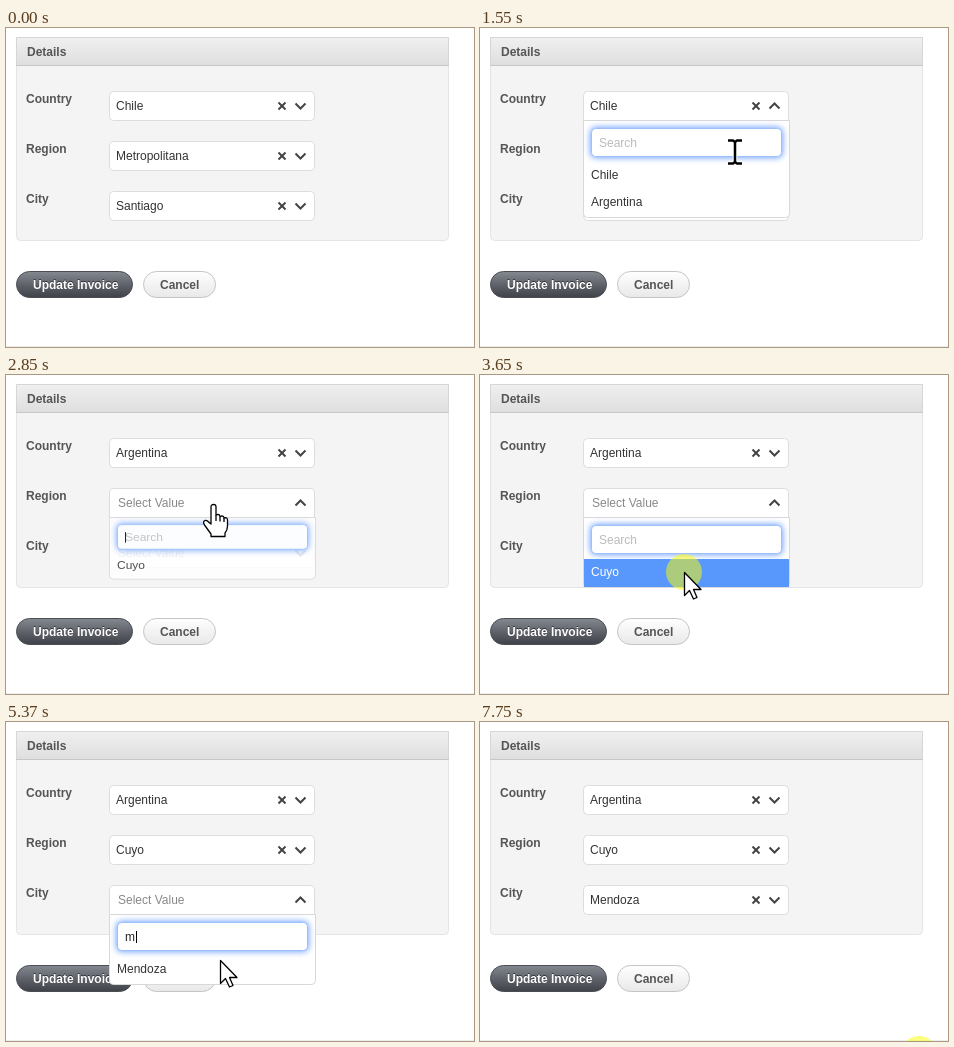
Animation of 468x319 px, one loop 7830 ms. Source, as an HTML page with a canvas:

```html
<!DOCTYPE html>
<html lang="en">
<head>
<meta charset="utf-8">
<title>Dependent selects</title>
<style>
  html, body { margin: 0; width: 100%; height: 100%; overflow: hidden; background: #fff; }
  canvas { display: block; }
</style>
</head>
<body>
<canvas id="stage" width="468" height="319"></canvas>
<script>
const ctx = document.getElementById('stage').getContext('2d');
const LOOP = 7830, STEP = 80;

// Screen updates: [first update, how many at STEP spacing]
const bursts = [[0, 1], [170, 9], [990, 18], [2450, 23], [4390, 5], [5040, 1], [5370, 3],
  [5700, 7], [6280, 3], [6520, 3], [6850, 2], [7100, 5], [7750, 1]];
const ticks = bursts.flatMap(([t, n]) => Array.from({ length: n }, (_, i) => t + i * STEP));

// Pointer path: [time, x, y]
const path = [
  [90, 434, 345], [810, 304, 79], [1150, 304, 79], [1550, 255, 124], [1870, 205, 172],
  [2030, 205, 172], [2270, 197, 152], [2610, 208, 130], [2850, 208, 129], [2930, 208, 129],
  [3330, 205, 165], [3570, 204, 197], [3730, 204, 197], [4130, 226, 183], [4210, 226, 184],
  [4470, 226, 184], [4710, 214, 238], [5370, 214, 238], [5530, 212, 240], [5620, 212, 240],
  [5940, 208, 246], [6180, 208, 241], [6440, 238, 239], [6680, 383, 255], [7020, 383, 255],
  [7420, 439, 332], [LOOP, 439, 332]
];
const clicks = [990, 1950, 2690, 3650, 4390, 6180, 6850, 7750];
const TYPED = 5370, BLUR = 6180;

const fields = [
  { label: 'Country', y: 63, open: 990, close: 2030, blur: 2690, options: ['Chile', 'Argentina'],
    value: t => t < 2030 ? 'Chile' : 'Argentina' },
  { label: 'Region', y: 113, open: 2770, close: 3730, blur: 4390, options: ['Cuyo'],
    value: t => t < 2030 ? 'Metropolitana' : t < 3730 ? '' : 'Cuyo' },
  { label: 'City', y: 163, open: 4470, close: 6280, blur: 6850, options: ['Mendoza'],
    value: t => t < 2030 ? 'Santiago' : t < 6280 ? '' : 'Mendoza' }
];

function pointer(t) {
  const i = path.findIndex(k => k[0] > t);
  if (i < 1) return { x: path[0][1], y: path[0][2] };
  const [t0, x0, y0] = path[i - 1], [t1, x1, y1] = path[i];
  const p = (t - t0) / (t1 - t0);
  return { x: Math.round(x0 + (x1 - x0) * p), y: Math.round(y0 + (y1 - y0) * p) };
}

function text(str, x, y, color, bold) {
  ctx.font = (bold ? 'bold ' : '') + '12px "Liberation Sans", Arial, sans-serif';
  ctx.fillStyle = color;
  ctx.fillText(str, x, y);
}

function box(x, y, w, h, r, fill, stroke) {
  ctx.beginPath();
  ctx.roundRect(x + .5, y + .5, w - 1, h - 1, r);
  ctx.fillStyle = fill;
  ctx.fill();
  ctx.strokeStyle = stroke;
  ctx.lineWidth = 1;
  ctx.stroke();
}

function glowBox(x, y, w, h, r) {
  ctx.save();
  ctx.shadowColor = 'rgba(70,135,255,.9)';
  ctx.shadowBlur = 6;
  box(x, y, w, h, r, '#fff', '#9dc0fa');
  ctx.restore();
  box(x, y, w, h, r, '#fff', '#9dc0fa');
}

function gradient(y0, y1, ...colors) {
  const g = ctx.createLinearGradient(0, y0, 0, y1);
  colors.forEach((c, i) => g.addColorStop(i / (colors.length - 1), c));
  return g;
}

function line(points, width, color) {
  ctx.beginPath();
  points.forEach(([x, y]) => ctx.lineTo(x, y));
  ctx.strokeStyle = color;
  ctx.lineWidth = width;
  ctx.stroke();
}

function drawPage() {
  ctx.fillStyle = '#fff';
  ctx.fillRect(0, 0, 468, 319);
  ctx.fillStyle = '#eee';
  ctx.fillRect(0, 318, 468, 1);
  box(10, 9, 433, 204, [0, 0, 4, 4], '#f4f4f4', '#e4e4e4');
  box(10, 9, 433, 29, 0, gradient(9, 38, '#f0f0f0', '#dedede'), '#d6d6d6');
  ctx.fillStyle = '#c8c8c8';
  ctx.fillRect(10, 37, 433, 1);
  text('Details', 21, 28, '#555', true);

  box(10, 243, 117, 27, 13, gradient(243, 270, '#858b92', '#60636b', '#3f4047'), '#4b4d54');
  text('Update Invoice', 27, 260, '#33343a', true);
  text('Update Invoice', 27, 261, '#fff', true);
  box(137, 243, 73, 27, 13, gradient(243, 270, '#fff', '#e8e8e8'), '#c4c4c4');
  text('Cancel', 154, 261, '#555', true);
}

function drawField(f, t, isOpen) {
  const { y } = f, value = f.value(t), mid = y + 15;
  const focused = (t >= f.close && t < f.blur) || t === 990 && f.open === 990;
  text(f.label, 20, y + 12, '#555', true);
  if (focused) glowBox(103, y, 206, 30, 4);
  else box(103, y, 206, 30, isOpen ? [4, 4, 0, 0] : 4, '#fff', '#ddd');
  if (value) {
    text(value, 110, y + 19, '#333');
    line([[272.5, mid - 3.5], [279.5, mid + 3.5]], 2, '#444');
    line([[279.5, mid - 3.5], [272.5, mid + 3.5]], 2, '#444');
  } else {
    text('Select Value', 112, y + 19, '#888');
  }
  const d = isOpen ? -2.5 : 2.5;
  line([[289.5, mid - d], [294.5, mid + d], [299.5, mid - d]], 2, '#444');
}

function drawDropdown(f, t, pos) {
  const p = Math.min(1, (t - f.open) / 200), top = f.y + 30;
  const typed = f.label === 'City' && t >= TYPED;
  ctx.save();
  ctx.globalAlpha = 1 - (1 - p) ** 4;
  ctx.translate(0, top);
  ctx.scale(1, .8 + .2 * p);
  box(103, -1, 207, 44 + 27 * f.options.length, [0, 0, 4, 4], '#fff', '#d8d8d8');

  const active = t < BLUR;
  if (active) glowBox(111, 7, 191, 29, 4);
  else box(111, 7, 191, 29, 4, '#fff', '#ddd');
  text(typed ? 'm' : 'Search', 119, 26, typed ? '#222' : '#bbb');
  const age = t - (typed ? TYPED : f.open);
  if (active && age % 1060 < 530) {
    ctx.fillStyle = '#000';
    ctx.fillRect(typed ? 130 : 119, 16, 1, 12);
  }

  f.options.forEach((name, i) => {
    const y = 42 + 27 * i, over = pos.y - top >= y && pos.y - top < y + 27;
    const lit = over && pos.x > 103 && pos.x < 310 && t !== TYPED;
    if (lit) {
      ctx.fillStyle = '#5897fb';
      ctx.fillRect(104, y - 1, 205, 28);
    }
    text(name, 111, y + 16, lit ? '#fff' : '#333');
  });
  ctx.restore();
}

function cursorKind({ x, y }, open) {
  if (x < 103 || x > 309) return 'arrow';
  if (open && y > open.y + 30) {
    const dy = y - open.y - 30;
    return x > 111 && x < 302 && dy > 7 && dy < 36 ? 'beam' : 'arrow';
  }
  return fields.some(f => y >= f.y && y < f.y + 30) ? 'hand' : 'arrow';
}

const shapes = {
  arrow: new Path2D('M.5 .5V23.5L5.5 18.5L9.5 27L13 25.5L9.5 17.5H17Z'),
  hand: new Path2D('M-3 20V3Q-3 .5 -.5 .5Q2 .5 2 3V11Q5.5 9.5 6 12.5Q9.5 11 10 14Q13.5 13 13.5 16V22' +
    'Q13.5 26 11 29V32.5H-3V30L-9.5 21Q-11.5 17.5 -9 16.5Q-7 16 -5 18.5Z'),
  knuckles: new Path2D('M2 11V17M6 12.5V17.5M10 14V18'),
  beam: new Path2D('M-7 -11.5H-2L0 -10L2 -11.5H7M0 -10V10M-7 11.5H-2L0 10L2 11.5H7')
};

function drawCursor(pos, kind) {
  ctx.save();
  ctx.translate(pos.x, pos.y);
  ctx.lineJoin = 'round';
  if (kind === 'beam') {
    ctx.strokeStyle = '#fff';
    ctx.lineWidth = 4.5;
    ctx.stroke(shapes.beam);
    ctx.strokeStyle = '#000';
    ctx.lineWidth = 2.5;
    ctx.stroke(shapes.beam);
  } else {
    ctx.fillStyle = '#fff';
    ctx.fill(shapes[kind]);
    ctx.strokeStyle = '#000';
    ctx.lineWidth = 1.3;
    ctx.stroke(shapes[kind]);
    if (kind === 'hand') ctx.stroke(shapes.knuckles);
  }
  ctx.restore();
}

function draw(now) {
  const time = now % LOOP;
  const t = ticks.findLast(k => k <= time);
  const pos = pointer(t);
  const open = fields.find(f => t > f.open && t < f.close);
  drawPage();
  fields.forEach(f => drawField(f, t, f === open));
  if (open) drawDropdown(open, t, pos);
  if (clicks.includes(t)) {
    ctx.beginPath();
    ctx.arc(pos.x, pos.y, 18, 0, 7);
    ctx.fillStyle = 'rgba(255,255,0,.5)';
    ctx.fill();
  }
  if (t > 0) drawCursor(pos, cursorKind(pos, open));
}

const start = performance.now();
function loop() {
  draw(performance.now() - start);
  requestAnimationFrame(loop);
}
loop();
</script>
</body>
</html>
```
